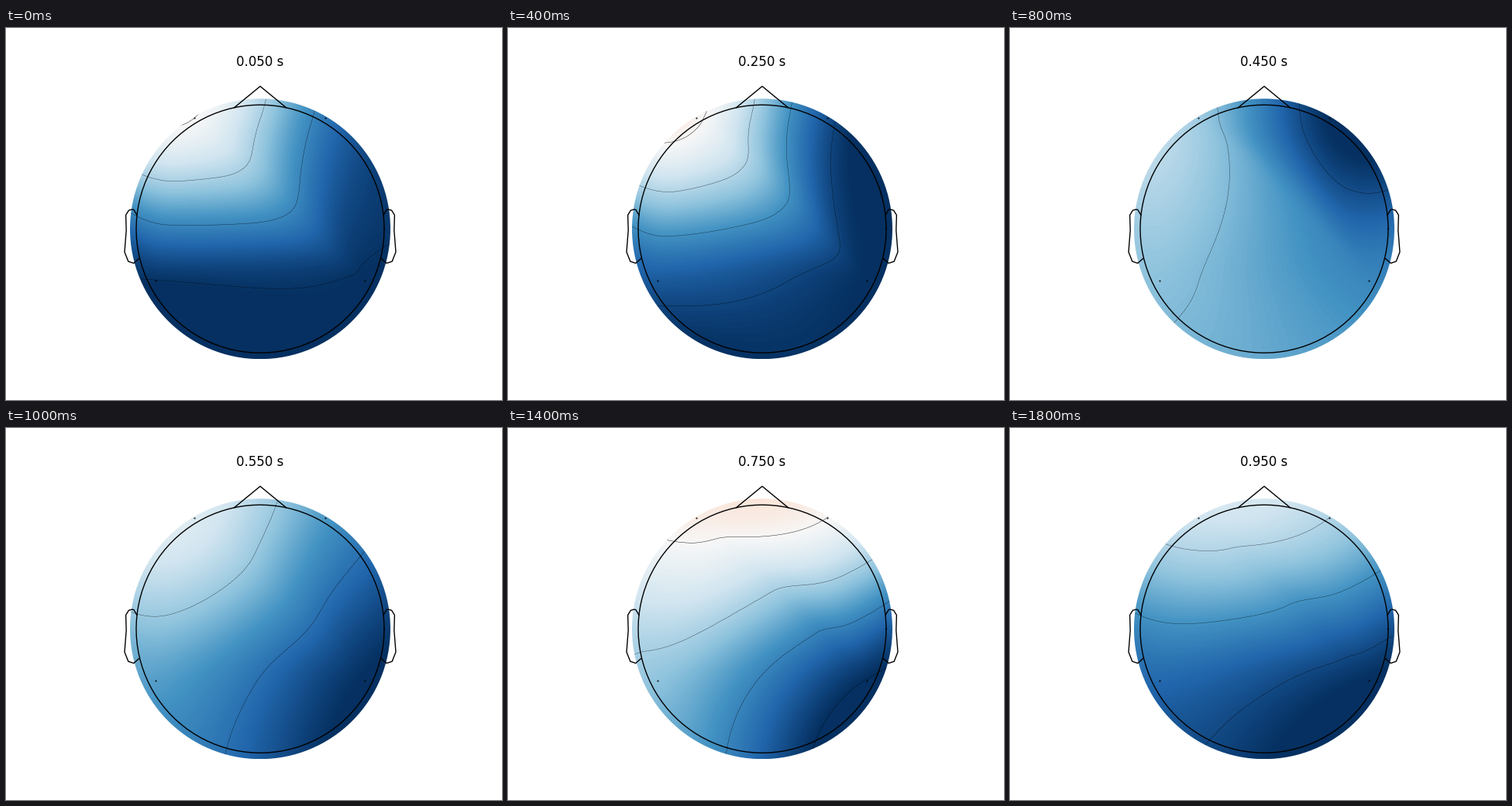
Recreate the animation shown at these times as a matplotlib script. Size 640x480 px, loop 2 s.

```python
import numpy as np
import matplotlib.pyplot as plt
from matplotlib.animation import ArtistAnimation
from matplotlib.patches import Circle
from matplotlib.tri import CubicTriInterpolator, Triangulation

# Lengths in pixels from the centre of the head
HEAD, MASK, RING = 160, 168, 428
SENSORS = np.array([(-85, 143), (84, 143.5), (-135.5, -67), (134.5, -67)])

# Key points of the four signals; one unit is one contour step
TIMES = [0.05, 0.25, 0.35, 0.55, 0.65, 0.85, 0.95]
SIGNALS = [
    [0.0, 0.1, -1.26, -0.35, 0.01, 0.4, -0.67],     # front left
    [-2.2, -2.85, -2.98, -1.53, 0.0, 0.0, -1.0],    # front right
    [-3.01, -2.75, -0.39, -1.47, 0.0, -2.43, -2.6],  # rear left
    [-3.06, -3.28, -0.27, -2.67, -3.33, -2.7, -3.33],  # rear right
]


def build_mesh():
    angle = np.arange(12) * np.pi / 6
    ring = RING * np.column_stack((np.cos(angle), np.sin(angle)))
    return Triangulation(*np.vstack((SENSORS, ring)).T)


def add_border(mesh, values):
    """Give each ring point the mean of the sensors it touches."""
    n = len(values)
    full = np.full(len(mesh.x), np.mean(values))
    full[:n] = values
    for i in range(n, len(full)):
        near = mesh.edges[(mesh.edges == i).any(axis=1)].ravel()
        near = near[near < n]
        if len(near):
            full[i] = full[near].mean()
    return full


def gradients(mesh, z):
    """Gradients that minimise the curvature along all mesh edges."""
    pts = np.column_stack((mesh.x, mesh.y))
    rows, rhs = [], []
    for i, j in mesh.edges:
        d = pts[j] - pts[i]
        weight = (np.hypot(*d) / 100) ** -1.5
        for sign, scale, target in ((1, 3 ** 0.5, 2 * (z[j] - z[i])),
                                    (-1, 1, 0)):
            row = np.zeros((len(z), 2))
            row[i] = d
            row[j] = sign * d
            rows.append(row.ravel() * weight * scale)
            rhs.append(target * weight * scale)
    grad = np.linalg.lstsq(np.array(rows), np.array(rhs), rcond=None)[0]
    return grad.reshape(-1, 2).T


def draw_head(ax):
    def outline(x, y):
        ax.plot(x, y, color="k", linewidth=1, zorder=4, clip_on=False)

    turn = np.linspace(0, 2 * np.pi, 101)
    outline(HEAD * np.cos(turn), HEAD * np.sin(turn))

    dx = np.deg2rad(12)
    dy = np.sqrt(1 - dx ** 2)
    outline(HEAD * np.array([-dx, 0, dx]), HEAD * np.array([dy, 1.15, dy]))

    ear_x, ear_y = np.array([
        (159, 17.8), (163.2, 24.8), (165.8, 25), (169.6, 23.9), (173.4, 17.8),
        (172.8, -1.8), (175, -29.8), (170.2, -42), (163.2, -44.3),
        (156.5, -38.4)]).T
    for side in (1, -1):
        outline(side * ear_x, ear_y)
    ax.scatter(*SENSORS.T, s=0.25, c="k", linewidths=1, zorder=3)


fig = plt.figure(figsize=(6.4, 4.8), dpi=100, facecolor="white")
ax = fig.add_subplot()
mask = Circle((0, 0), MASK, transform=ax.transData)
mesh = build_mesh()
axis = np.linspace(-MASK, MASK, 64)
grid = np.meshgrid(axis, axis)


def draw_map(time):
    values = np.array([np.interp(time, TIMES, s) for s in SIGNALS])
    peak = np.abs(values).max()
    z = add_border(mesh, values)
    field = CubicTriInterpolator(mesh, z, kind="user",
                                 dz=tuple(gradients(mesh, z)))(*grid)
    image = ax.imshow(field, cmap="RdBu_r", vmin=-peak, vmax=peak,
                      origin="lower", extent=(-MASK, MASK, -MASK, MASK),
                      aspect="auto", interpolation="bilinear")
    lines = ax.contour(*grid, field, levels=np.arange(-3, 4),
                       colors="k", linewidths=0.3)
    image.set_clip_path(mask)
    lines.set_clip_path(mask)
    label = ax.text(0, 209.9, f"{time:.3f} s", ha="center", va="baseline",
                    fontsize=12, family="DejaVu Sans")
    return [image, lines, label]


maps = [draw_map(0.05 + 0.1 * i) for i in range(10)]
draw_head(ax)
ax.set(xlim=(-248, 248), ylim=(-MASK, 1.2 * MASK))
ax.axis("off")

anim = ArtistAnimation(fig, maps, interval=200, repeat=True, repeat_delay=0)
plt.show()
```
